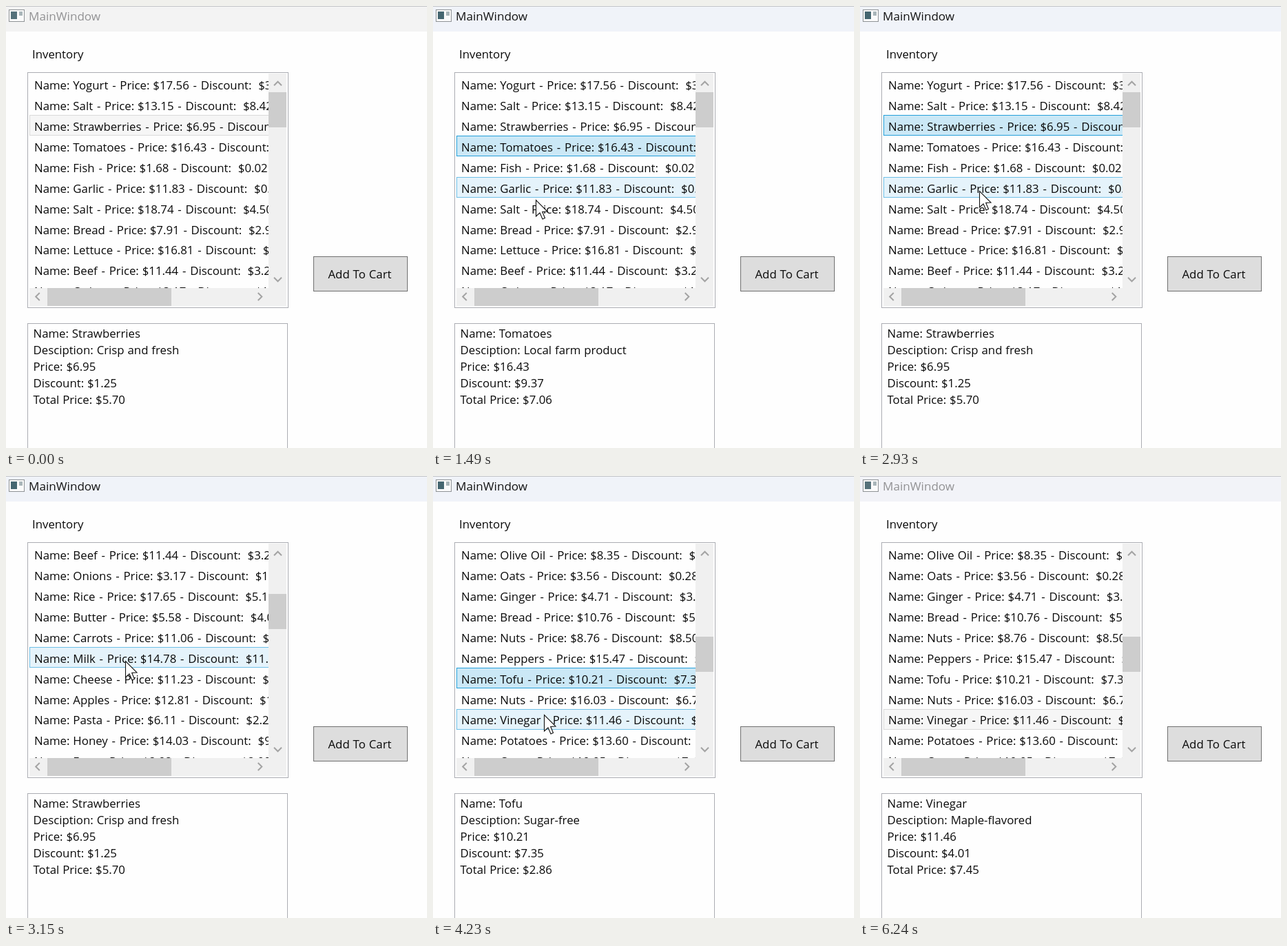
An HTML page with a canvas for the animation above (6300 ms loop, 611 by 641 pixels).

```html
<!DOCTYPE html>
<html lang="en">
<head>
<meta charset="utf-8">
<title>MainWindow</title>
<style>
  html, body { margin: 0; width: 100%; height: 100%; overflow: hidden; background: #fefefe; }
  canvas { display: block; }
</style>
</head>
<body>
<canvas id="stage" width="611" height="641"></canvas>
<script>
const ctx = document.getElementById('stage').getContext('2d');
const LOOP = 6300;
const STEP = 72.1;    // the screen updates once per step
const ENTER = 465;    // step 0: the pointer enters
const LEAVE = 64;
const FOCUS = 9, BLUR = 79;
const SCROLL = 34;    // after this step the wheel turns one notch per step
const NOTCHES = 7;
const ROW = 29.93;

let seed = 7;
const random = () => (seed = seed * 16807 % 2147483647) / 2147483647;

// Name, price, discount; missing amounts are made up.
const items = `Yogurt 17.56 3.18|Salt 13.15 8.42|Strawberries 6.95 1.25|Tomatoes 16.43 9.37
Fish 1.68 0.02|Garlic 11.83 0.64|Salt 18.74 4.50|Bread 7.91 2.93|Lettuce 16.81|Beef 11.44 3.27|Onions 3.17 1.08
Rice|Butter|Carrots|Milk|Cheese|Apples|Pasta|Honey|Eggs|Spinach
Olive Oil 8.35|Oats 3.56 0.28|Ginger 4.71 3.05|Bread 10.76 5.33|Nuts 8.76 8.50|Peppers 15.47|Tofu 10.21 7.35
Nuts 16.03 6.72|Vinegar 11.46 4.01|Potatoes 13.60|Oats 10.05 7.40`
  .split(/[|\n]/).map(entry => {
    const [, name, price, off] = entry.match(/^(\D+?)(?: ([\d.]+))?(?: ([\d.]+))?$/);
    const cost = price || (2 + 17 * random()).toFixed(2);
    return { name, price: cost, off: off || (cost * random()).toFixed(2) };
  });

// [step, selected item, its description]
const picks = [
  [0, 2, 'Crisp and fresh'], [9, 3, 'Local farm product'], [19, 7, 'Lean and healthy'],
  [28, 2, 'Crisp and fresh'], [47, 27, 'Sugar-free'], [56, 29, 'Maple-flavored']
];

// Pointer strokes: [first step, last step, x, y]
const strokes = [
  [0, 0, 581, 541], [0, 5, 150, 196], [8, 17, 148, 311], [21, 27, 164, 162],
  [30, 34, 173, 268], [42, 44, 170, 300], [48, 52, 161, 346], [60, 63, 548, 345]
];

const clamp = (v, lo, hi) => Math.min(hi, Math.max(lo, v));

function pointerAt(step) {
  if (step < 0 || step >= LEAVE) return null;
  let [, , x, y] = strokes[0];
  for (const [from, to, tx, ty] of strokes.slice(1)) {
    const u = clamp((step - from) / (to - from), 0, 1);
    const ease = u * u * (3 - 2 * u);
    x += (tx - x) * ease;
    y += (ty - y) * ease;
  }
  return { x: Math.round(x), y: Math.round(y) };
}

function rect(x, y, w, h, fill, stroke) {
  ctx.fillStyle = fill;
  ctx.fillRect(x, y, w, h);
  if (stroke) {
    ctx.strokeStyle = stroke;
    ctx.lineWidth = 1;
    ctx.strokeRect(x + .5, y + .5, w - 1, h - 1);
  }
}

function text(str, x, y, color = '#0a0a0a', size = 16.8) {
  ctx.font = size + 'px "Open Sans", "Noto Sans", sans-serif';
  ctx.fillStyle = color;
  for (const word of str.split(' ')) {
    const dash = word === '-';
    ctx.fillText(word, x + (dash ? .9 : 0), y);
    x += (dash ? 7.2 : ctx.measureText(word).width) + 4.9;
  }
}

function chevron(x, y, dx, dy) {
  ctx.strokeStyle = '#a3a3a3';
  ctx.lineWidth = 2;
  ctx.beginPath();
  ctx.moveTo(x - dx * 2.8 - dy * 5.5, y - dy * 2.8 - dx * 5.5);
  ctx.lineTo(x + dx * 2.8, y + dy * 2.8);
  ctx.lineTo(x - dx * 2.8 + dy * 5.5, y - dy * 2.8 + dx * 5.5);
  ctx.stroke();
}

function drawTitle(step, focused) {
  rect(0, 0, 611, 37, step < FOCUS ? '#f3f3f3' : focused ? '#f0f3f9' : '#f2f3f8');
  rect(0, 0, 611, 1, '#c3c4c8');
  rect(4, 5, 23, 18, '#fafafa', '#8f9396');
  rect(7, 8, 9, 11, focused ? '#456670' : '#55717a');
  rect(19, 8, 5, 6, '#a9b5b9');
  text('MainWindow', 33, 21, focused ? '#141414' : '#929294', 17.1);
}

function drawRow(i, item, selected, hovered, focused) {
  const style = selected
    ? (focused ? ['#cbe8f6', '#26a0da'] : ['#f6f6f6', '#dadada'])
    : hovered ? ['#e5f3fb', '#70c0e7'] : null;
  if (style) rect(34, 98 + Math.ceil(ROW * i), 420, 30, ...style);
  text(`Name: ${item.name} - Price: $${item.price} - Discount:  $${item.off}`,
    41, Math.floor(121.5 + ROW * i));
}

function drawList(step, pick, focused) {
  const notch = clamp(step - SCROLL, 0, NOTCHES);
  const top = 3 * notch;
  const tip = pointerAt(step - 1);    // the highlight trails by one step
  const inside = tip && tip.x > 34 && tip.x < 381 && tip.y > 98 && tip.y < 409;
  const over = inside ? Math.floor((tip.y - 98) / ROW) : -1;

  rect(31, 96, 379, 342, '#fefefe', '#abadb3');
  ctx.save();
  ctx.beginPath();
  ctx.rect(34, 98, 347, 311);
  ctx.clip();
  for (let i = 0; i < 11; i++) drawRow(i, items[top + i], top + i === pick, i === over, focused);
  ctx.restore();

  rect(381, 98, 26, 337, '#f0f0f0');
  rect(34, 409, 347, 26, '#f0f0f0');
  rect(381, 125 + Math.round(notch * 108 / NOTCHES), 26, 51, '#cdcdcd');
  rect(60, 409, 180, 26, '#cdcdcd');
  chevron(394.5, 112.5, 0, -1);
  chevron(394.5, 396.5, 0, 1);
  chevron(46, 421.5, -1, 0);
  chevron(368.5, 421.5, 1, 0);
}

function drawDetails({ name, price, off }, note) {
  rect(31, 460, 378, 200, '#fefefe', '#abadb3');
  [
    'Name: ' + name,
    'Desciption: ' + note,
    'Price: $' + price,
    'Discount: $' + off,
    'Total Price: $' + (price - off).toFixed(2)
  ].forEach((line, i) => text(line, 39.5, 481 + 24 * i));
}

function drawPointer(tip) {
  if (!tip) return;
  const shape = [[0, 0], [0, 23.5], [5.5, 18.5], [9.5, 27.5], [13, 26], [9.2, 17], [16.5, 16.5]];
  ctx.beginPath();
  for (const [dx, dy] of shape) ctx.lineTo(tip.x + .5 + dx, tip.y + .5 + dy);
  ctx.closePath();
  ctx.fillStyle = '#fff';
  ctx.fill();
  ctx.strokeStyle = '#111';
  ctx.lineWidth = 1.1;
  ctx.stroke();
}

function draw(now) {
  const step = Math.floor((now % LOOP - ENTER) / STEP);
  const focused = step >= FOCUS && step < BLUR;
  const [, pick, note] = picks.filter(p => p[0] <= Math.max(0, step)).pop();
  rect(0, 0, 611, 641, '#fefefe');
  drawTitle(step, focused);
  text('Inventory', 38, 76);
  drawList(step, pick, focused);
  drawDetails(items[pick], note);
  rect(446, 363, 137, 51, '#dddddd', '#707070');
  text('Add To Cart', 467.5, 395);
  drawPointer(pointerAt(step));
}

let start;
function tick(now) {
  if (start === undefined) start = now;
  draw(Math.max(0, now - start));
  requestAnimationFrame(tick);
}
draw(0);
requestAnimationFrame(tick);
</script>
</body>
</html>
```
